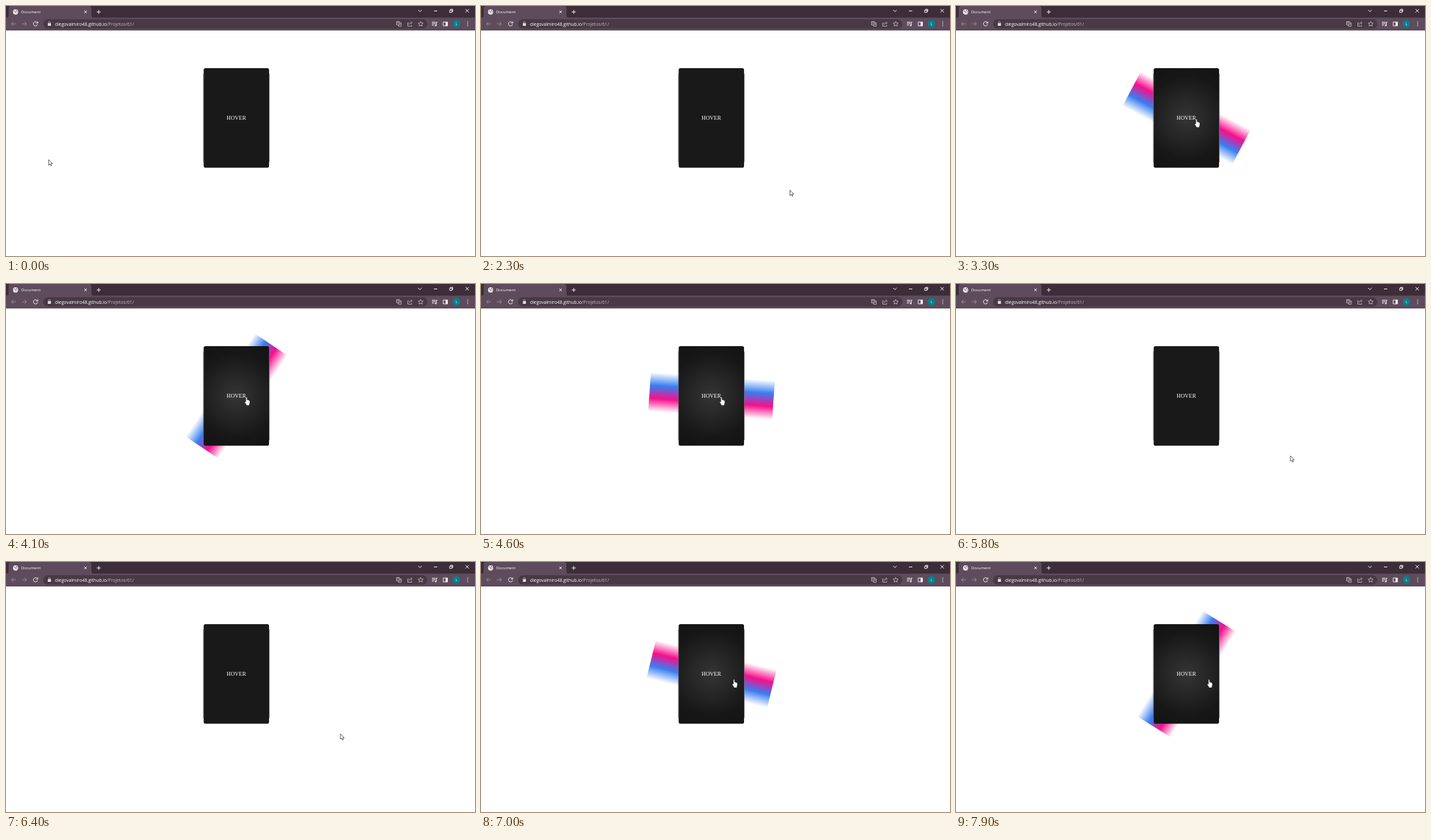
Recreate the animation shown at these times as an HTML page. Size 708x378 px, loop 8000 ms.

```html
<!DOCTYPE html>
<html lang="pt">
<head>
<meta charset="utf-8">
<title>Document</title>
<style>
  html, body { margin: 0; width: 100%; height: 100%; overflow: hidden; background: #fff; }
  svg { display: block; width: 708px; height: 378px; }
  .ui { font-family: "Open Sans", "Noto Sans", sans-serif; fill: #fff; }
  .line { fill: none; stroke: #f3eef2; stroke-width: 1; }
  .dim { stroke: #9a8c98; }
  .soft { stroke: #cfc6cd; stroke-width: .8; }
  .label { font: 8.5px "Liberation Serif", "Times New Roman", serif; fill: #fff; text-anchor: middle; }
</style>
</head>
<body>
<svg viewBox="0 0 708 378">
  <defs>
    <linearGradient id="beam" x1="0" y1="0" x2="0" y2="1">
      <stop offset="0" stop-color="#f80f8c" stop-opacity="0"/>
      <stop offset=".333" stop-color="#f80f8c"/>
      <stop offset=".667" stop-color="#387ef0"/>
      <stop offset="1" stop-color="#387ef0" stop-opacity="0"/>
    </linearGradient>
    <radialGradient id="glow" gradientUnits="userSpaceOnUse" cx="347.7" cy="169.2" r="90">
      <stop offset="0" stop-color="#353535"/>
      <stop offset=".7" stop-color="#171717"/>
      <stop offset="1" stop-color="#131313"/>
    </radialGradient>
  </defs>

  <!-- tab strip -->
  <rect width="708" height="18" fill="#3c2d39"/>
  <path d="M0 18Q4 18 4 14V4Q4 0 8 0H125Q129 0 129 4V14Q129 18 133 18Z" fill="#5e4b5c"/>
  <circle cx="14.5" cy="9" r="3.9" fill="#f4f0f3"/>
  <path d="M12 7.4l2 .6 .6 1.6 -1.2 1.6M15.4 6l.4 1.6 1.8 .4M16 10.4l1.2 .2" fill="none" stroke="#5e4b5c" stroke-width=".9"/>
  <text class="ui" x="23" y="11.2" font-size="6">Document</text>
  <path class="line" d="M118.2 7l3.8 3.8m0-3.8l-3.8 3.8M137 9h6M140 6v6"/>
  <path class="line" d="M622.3 6l2.6 2.6L627.500 6" stroke-width=".8"/>
  <path class="line" d="M646 7.500h5M669.800 6.300h3.400v3.400h-3.400zM671 6.300v-1.300h3.400v3.400h-1.200M693.700 4.700l5 5m0-5l-5 5" stroke-width=".8"/>

  <!-- toolbar -->
  <rect y="17.500" width="708" height="19.500" fill="#5e4b5c"/>
  <rect x="56" y="20" width="580" height="14.300" rx="7.150" fill="#483945"/>
  <path class="line dim" d="M15 27H8.300M11.400 23.900L8.300 27l3.100 3.100M24.300 27H31M27.900 23.900L31 27l-3.100 3.100"/>
  <path class="line" d="M47.300 25.200A3.200 3.200 0 1 0 47.700 27.800M48 23.400v2.500h-2.500" stroke-width="1.100"/>
  <path d="M63.200 26h4.600v4h-4.600z" fill="#e4dde2"/>
  <path class="line soft" d="M64.200 26v-1.100a1.300 1.300 0 0 1 2.600 0V26"/>
  <text class="ui" x="74" y="29.500" font-size="6.750">diegovalmiro48.github.io<tspan fill="#c3b8c0">/Projetos/61/</tspan></text>
  <path class="line soft" d="M589.500 23.500h4.500v5h-4.500zM594 25.500h2.700v5.200h-4.200l-.5-2.200M590.500 25.200h2.500m-1.200 0v1.800M594.600 27.500h1.400"/>
  <path class="line soft" d="M608 25.500h-1.500v5h6v-1.500M608.500 28.500q.3-3 3-3M611 23.500l2.200 2-2.200 2"/>
  <path class="line soft" d="M626 23.300l1.100 2.400 2.700 .3-2 1.800 .6 2.600-2.400-1.300-2.400 1.300 .6-2.600-2-1.800 2.700-.3z"/>
  <path class="line" d="M643 24.500h5.500M643 26.700h5.500M643 28.900h3M649.600 29.500v-5h1.600"/>
  <circle cx="648.700" cy="29.400" r="1.200" fill="#f3eef2"/>
  <path class="line" d="M660 24.200h6.400v5.800h-6.400z"/>
  <path d="M663.600 24h3v6.200h-3z" fill="#f3eef2"/>
  <circle cx="680" cy="27" r="5.700" fill="#00838f"/>
  <text class="ui" x="680" y="29" font-size="5.500" text-anchor="middle">L</text>
  <path d="M697 24.300v.01M697 27v.01M697 29.700v.01" stroke="#f3eef2" stroke-width="1.500" stroke-linecap="round"/>

  <!-- card -->
  <rect id="bar" x="-93.750" y="-29.700" width="187.500" height="59.400" fill="url(#beam)"/>
  <path d="M298 102V236M397.400 102V236" stroke="#777" stroke-width=".9"/>
  <rect id="card" x="298.400" y="94" width="98.700" height="150.500" rx="2.800" fill="#191919"/>
  <text class="label" x="347.700" y="172">HOVER</text>

  <!-- pointer -->
  <g id="pointer" stroke="#222" stroke-width=".7" stroke-linejoin="round" fill="#fff">
    <path id="arrow" d="M.4 .4V8.600L2.300 6.900 3.600 9.700 4.900 9.100 3.600 6.400H6.100Z"/>
    <path id="hand" stroke-width=".4" d="M-.9 .8Q0-.6 .9 .8V4.200Q2 3.700 2.500 4.600 3.600 4.300 4 5.200 5 5.200 5 6.400V8.600Q4.900 10 4.200 11V12.500H-.2V11.400L-2.600 7.900Q-2.700 6.500-1.400 6.900L-.9 7.500Z"/>
  </g>
</svg>
<script>
  const LOOP = 8000, STEP = 100, SPIN = 0.12; // degrees per ms
  const hovers = [[3067, 5450], [6885, LOOP]];
  // time, x, y of the pointer tip
  const path = [
    [0, 64, 232], [200, 64, 232], [300, 494, 207], [2200, 494, 207],
    [2300, 466, 278], [2500, 420, 304], [2700, 365, 313], [2900, 355, 272],
    [3100, 360, 215], [3300, 363, 171], [5200, 363, 171], [5400, 390, 200],
    [5600, 460, 242], [5800, 504.5, 259.5], [6400, 504.5, 259.5],
    [6600, 487, 252], [6700, 475, 243], [6900, 394, 192], [7000, 382, 177.5], [LOOP, 382, 177.5]
  ];
  const get = id => document.getElementById(id);
  const [bar, card, pointer, arrow, hand] = ["bar", "card", "pointer", "arrow", "hand"].map(get);
  const show = (el, on) => el.setAttribute("visibility", on ? "visible" : "hidden");

  function pointerAt(t) {
    const i = path.findIndex(p => p[0] > t);
    const [t0, x0, y0] = path[i - 1], [t1, x1, y1] = path[i];
    const k = (t - t0) / (t1 - t0);
    return [x0 + (x1 - x0) * k, y0 + (y1 - y0) * k];
  }

  function draw(time) {
    const t = Math.floor((time % LOOP) / STEP) * STEP;
    const hover = hovers.find(([from, to]) => t >= from && t < to);
    const angle = hover ? (t - hover[0]) * SPIN : 0;
    show(bar, hover);
    bar.setAttribute("transform", `translate(348 169.3) rotate(${angle})`);
    card.setAttribute("fill", hover ? "url(#glow)" : "#191919");
    show(hand, hover);
    show(arrow, !hover);
    pointer.setAttribute("transform", `translate(${pointerAt(t)})`);
  }

  const start = performance.now();
  function tick() {
    draw(performance.now() - start);
    requestAnimationFrame(tick);
  }
  tick();
</script>
</body>
</html>
```
